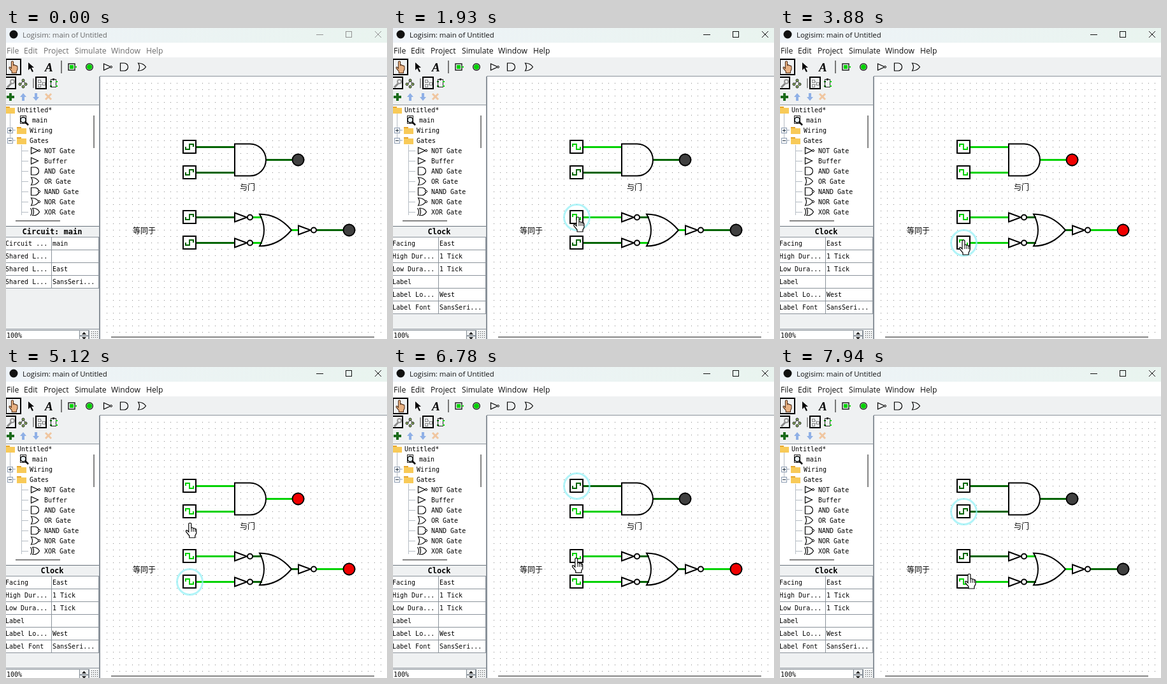
These frames come from a looping animation (598 px wide and 487 px high, 8000 ms). An HTML page with a canvas:

```html
<!DOCTYPE html>
<html lang="en">
<head>
<meta charset="utf-8">
<title>Logic circuit demo</title>
<style>
html, body { margin: 0; width: 100%; height: 100%; overflow: hidden; background: #fff; }
canvas { display: block; }
</style>
</head>
<body>
<canvas id="stage" width="598" height="487"></canvas>
<script>
const g = document.getElementById('stage').getContext('2d');
const LOOP = 8000, STEP = 80;
const HIGH = '#00d200', LOW = '#006400', PANEL = '#eff1f2', EDGE = '#8a929a';
const UI = '"Open Sans", "Noto Sans", sans-serif';
const MONO = '"DejaVu Sans Mono", "Liberation Mono", monospace';
const CJK = '"Noto Sans CJK SC", "Noto Sans CJK JP", sans-serif';

// Clock centres, top to bottom; each click toggles one
const CLOCK_X = 288, CLOCK_Y = [186, 226, 296, 336];
const CLICKS = [[1080, 0], [1930, 2], [3020, 1], [3800, 3], [5990, 0], [6860, 2], [7480, 1]];

// Pointer stops: time, x, y of the fingertip
const STOPS = [
  [370, 302, 476], [1080, 289, 184], [1320, 289, 184], [1930, 290, 296],
  [2490, 290, 296], [2870, 291, 226], [3250, 291, 226], [3720, 288, 332],
  [4500, 288, 332], [4580, 288, 327], [4740, 288, 326], [5200, 289, 221],
  [5590, 289, 221], [5910, 291, 190], [6070, 291, 190], [6390, 306, 290],
  [6460, 304, 291], [6620, 287, 297], [6860, 288, 300], [7320, 288, 225],
  [7620, 288, 225], [7940, 297, 324]
];

const HAND = new Path2D('M-2 12V2Q-2 0 0 0Q2 0 2 2V9Q2 7 3.5 7Q5 7 5 9Q5 8 6.5 8Q8 8 8 10Q8 9 9 9Q10 9 10 11V16L8 20V23H-1V20L-6 14Q-7 11 -4.5 11.5L-2 14Z');
const WAVE = new Path2D('M-6 0V4H0V-4H6V0');
const TRIANGLE = new Path2D('M0 -7L19 0L0 7Z');
const AND = new Path2D('M359 181H383A25 25 0 0 1 383 231H359Z');
const OR = new Path2D('M398 291Q427 291 448 316Q427 341 398 341Q412 316 398 291Z');
const SMALL = {
  buf: new Path2D('M0 -5L11 0L0 5Z'),
  and: new Path2D('M0 -6H6A6 6 0 0 1 6 6H0Z'),
  or: new Path2D('M0 -6Q8 -6 12 0Q8 6 0 6Q4 0 0 -6Z'),
  xor: new Path2D('M2 -6Q10 -6 13 0Q10 6 2 6Q6 0 2 -6M-1 -6Q3 0 -1 6')
};

function rect(x, y, w, h, color) {
  g.fillStyle = color;
  g.fillRect(x, y, w, h);
}

function frame(x, y, w, h, color = '#000', width = 1) {
  g.strokeStyle = color;
  g.lineWidth = width;
  g.strokeRect(x, y, w, h);
}

function line(x1, y1, x2, y2, color = '#000', width = 1) {
  g.beginPath();
  g.moveTo(x1, y1);
  g.lineTo(x2, y2);
  g.strokeStyle = color;
  g.lineWidth = width;
  g.stroke();
}

function disc(x, y, r, fill, stroke, width = 2) {
  g.beginPath();
  g.arc(x, y, r, 0, Math.PI * 2);
  if (fill) { g.fillStyle = fill; g.fill(); }
  if (stroke) { g.strokeStyle = stroke; g.lineWidth = width; g.stroke(); }
}

function shape(path, x, y, { fill, stroke = '#000', width = 2, flip = 1 } = {}) {
  g.save();
  g.translate(x, y);
  g.scale(1, flip);
  if (fill) { g.fillStyle = fill; g.fill(path); }
  g.strokeStyle = stroke;
  g.lineWidth = width;
  g.stroke(path);
  g.restore();
}

function poly(points, fill) {
  g.beginPath();
  for (let i = 0; i < points.length; i += 2) g.lineTo(points[i], points[i + 1]);
  g.closePath();
  g.fillStyle = fill;
  g.fill();
}

function text(str, x, y, font, color = '#000', align = 'left') {
  g.font = font;
  g.fillStyle = color;
  g.textAlign = align;
  g.fillText(str, x, y);
}

const mono = (str, x, y) => text(str, x, y, `10px ${MONO}`);

function titleBar(active) {
  const tint = g.createLinearGradient(0, 0, 598, 0);
  tint.addColorStop(0, '#eef3f8');
  tint.addColorStop(1, '#e9f4ef');
  rect(0, 0, 598, 23, tint);
  disc(12, 10, 6.5, '#111');
  text('Logisim: main of Untitled', 26, 15, `11.4px ${UI}`, active ? '#111' : '#666');
  const ink = active ? '#111' : '#929292';
  line(487, 10.5, 498, 10.5, ink);
  frame(533.5, 5.5, 9, 9, ink);
  line(579, 5, 589, 15, ink);
  line(589, 5, 579, 15, ink);

  rect(0, 23, 598, 24, '#fff');
  const items = [['File', 1], ['Edit', 28], ['Project', 59], ['Simulate', 108], ['Window', 165], ['Help', 220]];
  for (const [name, x] of items) text(name, x, 40, `12.2px ${UI}`, active ? '#111' : '#6d6d6d');
}

function toolbar() {
  rect(0, 46, 598, 30, PANEL);
  frame(0, 49, 23, 24, '#000', 2);
  g.save();
  g.translate(10, 52);
  g.scale(0.8, 0.8);
  shape(HAND, 0, 0, { fill: '#e9b182', stroke: '#4a2a14', width: 1.3 });
  g.restore();
  poly([35, 54, 35, 66, 38, 63, 41, 69, 43, 68, 40, 62, 44, 62], '#000');
  text('A', 61, 68, 'bold italic 19px "Liberation Serif", "Noto Serif", serif');
  line(87, 51, 87, 71, '#777', 2);
  frame(98, 56, 10, 10, '#222', 1.5);
  rect(100, 58, 6, 6, HIGH);
  line(108, 61, 111, 61, HIGH, 2);
  disc(131, 61, 5.3, '#fff', '#222', 1.5);
  disc(131, 61, 4, HIGH);
  shape(SMALL.buf, 153.5, 61, { width: 1.2 });
  disc(165, 61, 1.5, '#fff', '#000', 1);
  shape(SMALL.and, 179.5, 61, { width: 1.2 });
  shape(SMALL.or, 207.5, 61, { width: 1.2 });
}

function explorerTools() {
  rect(0, 76, 147, 44, PANEL);
  frame(-1, 77, 16, 18, '#000', 2);
  line(2, 93, 9, 86, '#888', 3);
  disc(10, 84, 3, null, '#999', 2);
  line(27, 82, 22, 90, '#222');
  line(27, 82, 32, 90, '#222');
  for (const [x, y] of [[27, 82], [22, 88], [31, 88], [27, 92]]) disc(x, y, 2, '#8db85a', '#222', 1);
  line(43, 79, 43, 94, '#999', 2);
  frame(47, 77, 16, 18, '#000', 2);
  for (const [x, y] of [[50.5, 81.5], [50.5, 88.5], [57.5, 85.5]]) frame(x, y, 4, 4, '#888');
  line(54, 83, 58, 86, '#888');
  line(54, 90, 58, 87, '#888');
  frame(70.5, 80.5, 8, 12, '#222');
  rect(73, 79, 3, 3, '#222');
  for (const y of [83, 90]) { rect(69, y, 3, 2, LOW); rect(78, y, 3, 2, HIGH); }
  rect(1, 106, 12, 4, '#1b6b1b');
  rect(5, 102, 4, 12, '#1b6b1b');
  poly([27, 102, 32, 108, 29, 108, 29, 114, 25, 114, 25, 108, 22, 108], '#8fb0e6');
  poly([47, 114, 52, 108, 49, 108, 49, 102, 45, 102, 45, 108, 42, 108], '#8fb0e6');
  line(62, 103, 71, 112, '#f0c6a0', 3);
  line(71, 103, 62, 112, '#f0c6a0', 3);
}

function folder(x, y) {
  rect(x, y - 5, 7, 4, '#e5a52c');
  rect(x, y - 3, 15, 9, '#f8ca58');
}

function expander(y, open) {
  line(6, y, 15, y, '#9aa6b2');
  rect(2, y - 4, 9, 9, '#fff');
  frame(2.5, y - 3.5, 8, 8, '#8a9ab0');
  line(4, y + 0.5, 9, y + 0.5, '#234');
  if (!open) line(6.5, y - 2, 6.5, y + 3, '#234');
}

function tree() {
  rect(0, 120, 147, 190, '#fff');
  line(0, 120.5, 147, 120.5, EDGE);
  line(6.5, 134, 6.5, 172, '#b5bcc4');
  line(24.5, 183, 24.5, 293, '#b5bcc4');
  folder(-1, 128);
  mono('Untitled*', 18, 132);
  frame(22.5, 137.5, 9, 12, '#222');
  disc(27, 144, 4.2, '#e5eef2', '#000', 1.6);
  line(30, 147, 35, 152, '#000', 2.5);
  mono('main', 41, 148);
  expander(160, false);
  folder(17, 160);
  mono('Wiring', 37, 164);
  expander(176, true);
  folder(17, 176);
  mono('Gates', 37, 180);
  const gates = [['NOT Gate', 'buf', 1], ['Buffer', 'buf'], ['AND Gate', 'and'], ['OR Gate', 'or'],
    ['NAND Gate', 'and', 1], ['NOR Gate', 'or', 1], ['XOR Gate', 'xor']];
  gates.forEach(([name, kind, bubble], i) => {
    const y = 192 + 16 * i;
    line(25, y + 0.5, 35, y + 0.5, '#b5bcc4');
    shape(SMALL[kind], 39.5, y, { width: 1.2 });
    if (bubble) disc(52, y, 1.6, '#fff', '#000', 1);
    mono(name, 60, y + 4);
  });
  rect(0, 294, 147, 16, '#fff');
  rect(15, 301, 70, 2, '#858585');
  rect(137, 137, 2, 51, '#858585');
}

function attributes(active) {
  rect(0, 310, 147, 177, PANEL);
  line(0, 310.5, 147, 310.5, '#69737d');
  text(active ? 'Clock' : 'Circuit: main', 72.5, 323, `bold 12px ${MONO}`, '#000', 'center');
  const rows = active
    ? [['Facing', 'East'], ['High Dur...', '1 Tick'], ['Low Dura...', '1 Tick'], ['Label', ''],
       ['Label Lo...', 'West'], ['Label Font', 'SansSeri...']]
    : [['Circuit ...', 'main'], ['Shared L...', ''], ['Shared L...', 'East'], ['Shared L...', 'SansSeri...']];
  rect(0, 328, 146, rows.length * 20, '#fff');
  line(0, 327.5, 146, 327.5, EDGE);
  rows.forEach(([name, value], i) => {
    const y = 328 + 20 * i;
    mono(name, -1, y + 13);
    mono(value, 73, y + 13);
    line(0, y + 19.5, 146, y + 19.5, EDGE);
  });
  const bottom = 328 + rows.length * 20;
  line(71.5, 328, 71.5, bottom, EDGE);
  line(145.5, 328, 145.5, bottom, EDGE);

  line(0, 471.5, 147, 471.5, EDGE);
  rect(0, 473, 114, 14, '#fff');
  frame(-0.5, 473.5, 131, 20, EDGE);
  mono('100%', 1, 485);
  frame(115.5, 473.5, 14, 8, EDGE);
  frame(115.5, 482.5, 14, 8, EDGE);
  poly([119, 480, 126, 480, 122.5, 476], '#222');
  poly([119, 484, 126, 484, 122.5, 488], '#222');
  for (let x = 134; x < 146; x += 3)
    for (let y = 475; y < 487; y += 3) rect(x, y, 1, 1, '#444');
  line(146.5, 76, 146.5, 487, EDGE);
}

function sheet(wideBar) {
  rect(147, 76, 451, 411, '#fff');
  for (let x = 158; x < 590; x += 10)
    for (let y = 86; y < 480; y += 10) rect(x, y, 1, 1, '#858585');
  line(147, 75.5, 598, 75.5, EDGE);
  line(147.5, 76, 147.5, 487, EDGE);
  const h = wideBar ? 5 : 2;
  rect(165, 484.5 - h / 2 | 0, 413, h, '#858585');
}

function wire(x1, x2, y, on) {
  line(x1, y + 0.5, x2, y + 0.5, on ? HIGH : LOW, 3);
}

function notGate(x, y) {
  shape(TRIANGLE, x + 1, y + 0.5);
  disc(x + 25, y + 0.5, 4, '#fff', '#000');
}

function lamp(x, y, on) {
  disc(x + 0.5, y + 0.5, 9, on ? '#f00000' : '#404040', '#000');
}

function circuit([a, b, c, d]) {
  const both = a && b, either = !c || !d;
  wire(298, 359, 186, a);
  wire(298, 359, 226, b);
  wire(408, 449, 206, both);
  shape(AND, 0, 0.5);
  lamp(458, 206, both);

  wire(298, 359, 296, c);
  wire(298, 359, 336, d);
  wire(387, 402, 296, !c);
  wire(387, 402, 336, !d);
  wire(448, 459, 316, either);
  wire(487, 529, 316, !either);
  notGate(358, 296);
  notGate(358, 336);
  notGate(458, 316);
  shape(OR, 0, 0.5);
  lamp(538, 316, !either);

  [a, b, c, d].forEach((on, i) => {
    const y = CLOCK_Y[i];
    rect(278, y - 10, 20, 20, '#fff');
    frame(278, y - 10, 20, 20, '#000', 2);
    shape(WAVE, CLOCK_X, y, { stroke: on ? HIGH : LOW, flip: on ? -1 : 1 });
  });
  text('与门', 367, 253.5, `12px ${CJK}`);
  text('等同于', 199, 321.5, `12px ${CJK}`);
}

function pointer(t) {
  if (t < STOPS[0][0]) return;
  let i = STOPS.length - 1;
  while (STOPS[i][0] > t) i--;
  const [t0, x0, y0] = STOPS[i];
  const [t1, x1, y1] = STOPS[i + 1] || [LOOP, x0, y0];
  const p = Math.floor((t - t0) / STEP) * STEP / (t1 - t0);
  const k = p * p * (3 - 2 * p);
  shape(HAND, x0 + (x1 - x0) * k, y0 + (y1 - y0) * k, { fill: '#fff', width: 1.2 });
  if (y0 + (y1 - y0) * k < 470) {
    const x = Math.round(x0 + (x1 - x0) * k), y = Math.round(y0 + (y1 - y0) * k);
    for (const dx of [2, 5, 8]) line(x + dx, y + 9, x + dx, y + 14);
  }
}

function draw(t) {
  const done = CLICKS.filter(([at]) => t >= at);
  const state = [false, false, false, false];
  for (const [, i] of done) state[i] = !state[i];
  const active = done.length > 0;

  titleBar(active);
  toolbar();
  sheet(t >= 450 && t < 1480);
  explorerTools();
  tree();
  attributes(active);
  circuit(state);
  if (active) disc(CLOCK_X + 0.5, CLOCK_Y[done[done.length - 1][1]] + 0.5, 20, null, 'rgba(145, 240, 245, 0.7)', 3);
  pointer(t);
}

function tick() {
  draw(performance.now() % LOOP);
  requestAnimationFrame(tick);
}
tick();
</script>
</body>
</html>
```
